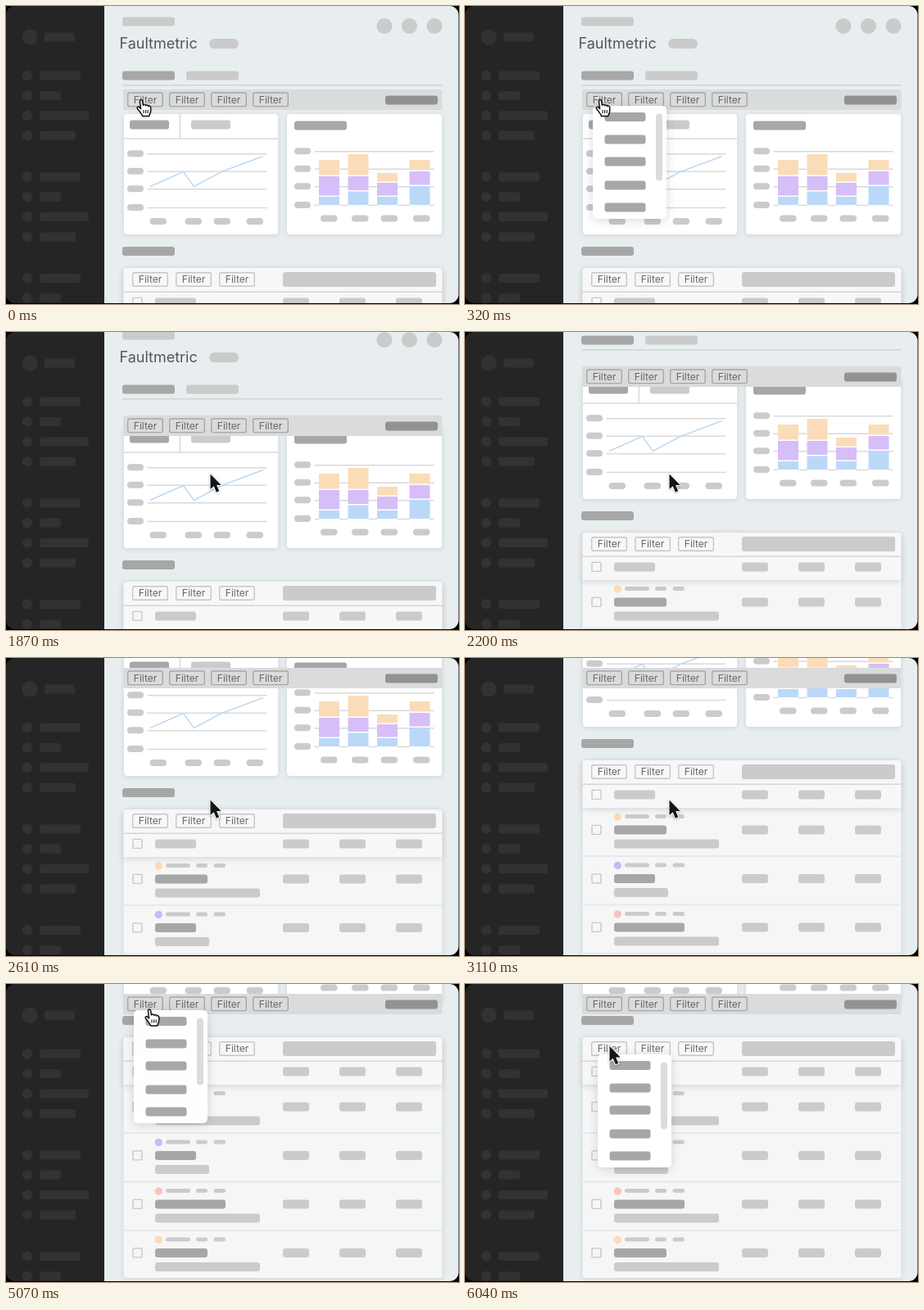
Animation of 553 by 364 pixels, one loop 6620 ms. Source, as an HTML page with a canvas:

```html
<!DOCTYPE html>
<html lang="en">
<head>
<meta charset="utf-8">
<title>Dashboard filters</title>
<style>
html, body { margin: 0; width: 100%; height: 100%; overflow: hidden; background: #000; }
canvas { display: block; width: 553px; height: 364px; }
</style>
</head>
<body>
<canvas id="stage"></canvas>
<script>
const W = 553, H = 364, LOOP = 6620, TICK = 80;
const FONT = 'Inter, Roboto, sans-serif';
const LIGHT = '#cbcbcb', MID = '#a7a7a7', RULE = '#d9d9d9';
const ORANGE = '#fbdcb9', PURPLE = '#d6bef8', BLUE = '#bbd8f9';

const canvas = document.getElementById('stage');
const ctx = canvas.getContext('2d');
const dpr = window.devicePixelRatio || 1;
canvas.width = W * dpr;
canvas.height = H * dpr;

// ---- drawing helpers ----
function box(x, y, w, h, r, fill, stroke) {
  ctx.beginPath();
  ctx.roundRect(x, y, w, h, r);
  if (fill) { ctx.fillStyle = fill; ctx.fill(); }
  if (stroke) { ctx.strokeStyle = stroke; ctx.lineWidth = 1.4; ctx.stroke(); }
}

// Rounded bar from x1 to x2, centred on y
function pill(x1, x2, y, h = 11, color = LIGHT, r = 3) {
  box(x1, y - h / 2, x2 - x1, h, r, color);
}

function dot(x, y, r, color) {
  ctx.beginPath();
  ctx.arc(x, y, r, 0, 7);
  ctx.fillStyle = color;
  ctx.fill();
}

function line(x1, y1, x2, y2, color = RULE, width = 1.5) {
  ctx.beginPath();
  ctx.moveTo(x1, y1);
  ctx.lineTo(x2, y2);
  ctx.strokeStyle = color;
  ctx.lineWidth = width;
  ctx.stroke();
}

function shadowed(blur, dy, alpha, draw) {
  ctx.save();
  ctx.shadowColor = `rgba(40,50,60,${alpha})`;
  ctx.shadowBlur = blur * dpr;
  ctx.shadowOffsetY = dy * dpr;
  draw();
  ctx.restore();
}

function filterButton(x, y, border, ink) {
  box(x + .7, y - 8.3, 42.6, 16.6, 2, null, border);
  ctx.font = `12px ${FONT}`;
  ctx.textAlign = 'center';
  ctx.fillStyle = ink;
  ctx.fillText('Filter', x + 22, y + 4.3);
}

// ---- page parts ----
function sidebar() {
  const ink = '#323232', ends = [91, 67, 101, 85];
  ctx.fillStyle = '#252525';
  ctx.fillRect(0, 0, 120, H);
  dot(29, 38, 9.5, ink);
  pill(47, 84, 38, 11, ink);
  for (let i = 0; i < 10; i++) {
    const y = 85 + 24.4 * (i % 4) + 123.7 * Math.floor(i / 4);
    dot(26, y, 6.2, ink);
    pill(41, ends[i % 4], y, 11, ink);
  }
}

function pageHead() {
  pill(142, 206, 19);
  ctx.font = `18px ${FONT}`;
  ctx.textAlign = 'left';
  ctx.fillStyle = '#555';
  ctx.fillText('Faultmetric', 138.5, 52);
  pill(248, 284, 46, 12, LIGHT, 6);
  for (const x of [462, 492.5, 523]) dot(x, 24.5, 9.5, LIGHT);
  pill(142, 206, 85, 11, MID);
  pill(220, 284, 85);
  line(142, 96.7, 533, 96.7, '#d0d4d6');
}

function card(x, w) {
  shadowed(6, 1, .14, () => box(x, 132, w, 147, 4, '#fff'));
}

// Axis labels and grid lines of a chart
function axes(x, top, labels, labelY) {
  for (const dy of [0, 21.5, 43, 65.7]) {
    pill(x, x + 20, top + dy, 8, LIGHT, 4);
    line(x + 24.5, top + dy + .5, x + 170.5, top + dy + .5);
  }
  for (const lx of labels) pill(lx, lx + 20.5, labelY, 8, LIGHT, 4);
}

function lineCard() {
  card(144, 188);
  pill(151, 199, 145, 11, MID);
  pill(226, 274, 145);
  line(212.3, 132, 212.3, 162);
  line(144, 162, 332, 162);
  axes(148, 180.3, [175.5, 218.5, 253.5, 293.5], 263);
  ctx.beginPath();
  [[176, 220.5], [216.5, 202.5], [229.5, 220.5], [263, 202.5], [314, 183.5]]
    .forEach(p => ctx.lineTo(...p));
  ctx.strokeStyle = '#bfdaf3';
  ctx.lineWidth = 1.5;
  ctx.stroke();
}

function barCard() {
  card(343, 189);
  pill(352, 416, 146, 11, MID);
  axes(352, 177.3, [384, 422, 457.5, 497], 259.5);
  // x, orange top, purple top, blue top
  const bars = [[382, 188, 208, 233], [417.5, 181, 208, 226.5], [453, 204, 216, 233], [492.5, 188, 202, 220]];
  for (const [x, a, b, c] of bars) {
    const stack = [[a, b, ORANGE], [b, c, PURPLE], [c, 244.5, BLUE]];
    for (const [y1, y2, color] of stack) {
      ctx.fillStyle = '#fff';
      ctx.fillRect(x, y1, 25, y2 - y1);
      ctx.fillStyle = color;
      ctx.fillRect(x, y1, 25, y2 - y1 - 1.5);
    }
  }
}

function columns(y) {
  box(155, y - 5.6, 11, 11, 1, null, '#c8c8c8');
  for (const x of [338, 407, 476]) pill(x, x + 32, y);
}

function table() {
  shadowed(6, 1, .14, () => box(143.5, 320, 389, 294, 4, '#f6f6f6'));
  const rows = [[246, 310, ORANGE], [232, 248, '#c4bcfa'], [268, 310, '#f8c3bb'], [246, 310, ORANGE]];
  rows.forEach(([title, text, color], i) => {
    const y = 405 + 59.5 * i;
    dot(186.3, y - 16, 4.7, color);
    for (const [a, b] of [[195, 225], [232, 246], [253.5, 268]]) pill(a, b, y - 16.5, 5, LIGHT, 2.5);
    pill(182, title, y, 11, MID);
    pill(182, text, y + 17);
    columns(y);
    if (i < 3) line(143.5, y + 32, 532.5, y + 32, '#e4eaec', 2);
  });
  shadowed(7, 3, .13, () => box(143.5, 320, 389, 58, [4, 4, 0, 0], '#f7f7f7'));
  for (const x of [154, 207, 260]) filterButton(x, 334, '#c6c6c6', '#666');
  box(338, 325, 187, 18, 3, LIGHT);
  line(143.5, 349.2, 532.5, 349.2, '#d6d6d6');
  pill(182, 232, 362);
  columns(362);
}

function stickyBar(y) {
  box(143, y, 389.5, 25, 2, '#dadbdb');
  for (let i = 0; i < 4; i++) filterButton(148 + 51 * i, y + 12.3, '#a6a6a6', '#666');
  pill(463, 527, y + 13, 11, '#929292');
}

function dropdown(x, y, alpha) {
  if (alpha <= 0) return;
  ctx.save();
  ctx.globalAlpha = alpha;
  shadowed(12, 2, .18, () => box(x, y, 90, 138, 5, '#fff'));
  for (const dy of [13.5, 41, 68, 97, 124]) pill(x + 14.5, x + 64.5, y + dy, 11, MID);
  box(x + 77, y + 9.5, 8, 82, 4, '#dcdcdc');
  ctx.restore();
}

// ---- cursors, with the hotspot at 0,0 ----
const arrowPath = new Path2D('M0 0V18.6L4.2 14.8L7.4 22.2L10.7 20.8L7.6 13.6H13.2Z');
const handPath = new Path2D(
  'M-1.6 1.4C-1.6 -.6 1.4 -.6 1.6 1.4L2.4 6.8C3 5.4 5.4 5.6 5.6 7.2C6.4 6 8.6 6.4 8.7 8' +
  'C9.6 7 11.7 7.6 11.7 9.4V13.4C11.7 16 10 17.4 9.8 20H1.6C1.2 18 -.4 16.4 -1.8 14.4' +
  'L-4.6 10.8C-5.6 9.2 -3.6 7.8 -2.2 9.2L-.4 11Z');
const creases = new Path2D('M3 12.5V16.5M5.6 12.5V16.5M8.2 12.5V16.5');

function cursor(x, y, hand) {
  ctx.save();
  ctx.translate(x, y);
  ctx.lineJoin = 'round';
  if (hand < 1) {
    ctx.globalAlpha = 1 - hand;
    ctx.strokeStyle = '#fff';
    ctx.lineWidth = 2;
    shadowed(3, 1, .3, () => ctx.stroke(arrowPath));
    ctx.fillStyle = '#151515';
    ctx.fill(arrowPath);
  }
  if (hand > 0) {
    ctx.globalAlpha = hand;
    ctx.fillStyle = '#fff';
    ctx.strokeStyle = '#151515';
    ctx.lineWidth = 1.5;
    shadowed(3, 1, .3, () => ctx.fill(handPath));
    ctx.stroke(handPath);
    ctx.lineWidth = 1.1;
    ctx.stroke(creases);
  }
  ctx.restore();
}

// ---- timing ----
const ease = p => p < .5 ? 4 * p ** 3 : 1 - 4 * (1 - p) ** 3;

// Eased progress in n ticks, the first one landing at start
function ticks(t, start, n) {
  const k = Math.floor((t - start) / TICK) + 1;
  return ease(Math.min(n, Math.max(0, k)) / n);
}

// time, page scroll, sticky bar top
const scrolls = [[0, 0, 102], [1870, 15, 102], [2200, 75, 42], [2610, 135, 12], [3110, 195, 12], [3440, 255, 12]];

// start, ticks, end x, end y, hand or arrow
const moves = [[810, 6, 249.5, 173.5, 0], [3600, 7, 175, 30.5, 1], [5070, 7, 176.5, 76, 0]];

function cursorAt(t) {
  let at = [165, 114.5, 1];
  for (const [start, n, ...to] of moves) {
    const p = ticks(t, start, n);
    at = at.map((v, i) => v + (to[i] - v) * p);
  }
  return at;
}

function render(t) {
  const [, scroll, barY] = scrolls.filter(s => s[0] <= t).pop();
  ctx.setTransform(dpr, 0, 0, dpr, 0, 0);
  ctx.fillStyle = '#000';
  ctx.fillRect(0, 0, W, H);
  ctx.save();
  ctx.beginPath();
  ctx.roundRect(0, 0, 552.5, 363, 11);
  ctx.clip();
  ctx.fillStyle = '#e8edf0';
  ctx.fillRect(120, 0, W, H);

  ctx.save();
  ctx.translate(0, -scroll);
  pageHead();
  lineCard();
  barCard();
  pill(142, 206, 299.5, 11, MID);
  table();
  ctx.restore();

  stickyBar(barY);
  sidebar();
  dropdown(156, 122, ticks(t, 80, 4) - ticks(t, 810, 6));
  dropdown(156, 32, ticks(t, 4330, 5) - ticks(t, 5070, 7));
  dropdown(162, 86, ticks(t, 5800, 4));
  cursor(...cursorAt(t));
  ctx.restore();
}

const begin = performance.now();
function frame() {
  render((performance.now() - begin) % LOOP);
  requestAnimationFrame(frame);
}
frame();
</script>
</body>
</html>
```
